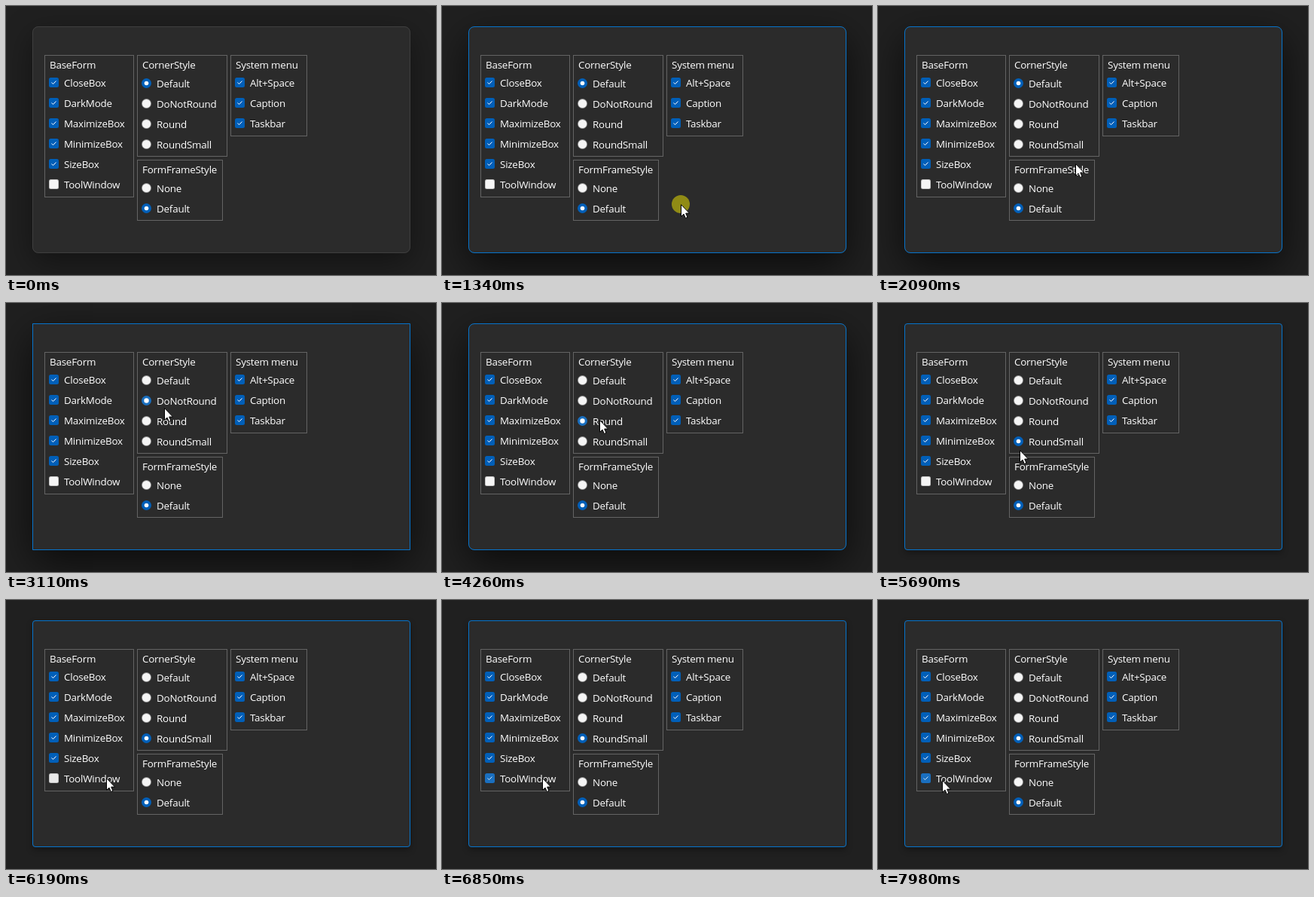
Recreate the animation shown at these times as an HTML page with a canvas. Size 571 by 357 pixels, loop 8000 ms.

```html
<!DOCTYPE html>
<html lang="en">
<head>
<meta charset="utf-8">
<title>Form options</title>
<style>
html, body { margin: 0; width: 100%; height: 100%; overflow: hidden; background: #202020; }
canvas { display: block; }
</style>
</head>
<body>
<canvas id="stage" width="571" height="357"></canvas>
<script>
const ctx = document.getElementById('stage').getContext('2d');
const LOOP = 8000, PITCH = 27;
const BLUE = '#005fb8', BLUE_HOVER = '#1a6fbf';

const groups = [
  { title: 'BaseForm', x: 51, y: 65, w: 119, h: 189, type: 'check',
    items: ['CloseBox', 'DarkMode', 'MaximizeBox', 'MinimizeBox', 'SizeBox', 'ToolWindow'] },
  { title: 'CornerStyle', x: 174, y: 65, w: 120, h: 135, type: 'radio',
    items: ['Default', 'DoNotRound', 'Round', 'RoundSmall'] },
  { title: 'FormFrameStyle', x: 174, y: 204, w: 114, h: 81, type: 'radio',
    items: ['None', 'Default'] },
  { title: 'System menu', x: 298, y: 65, w: 102, h: 108, type: 'check',
    items: ['Alt+Space', 'Caption', 'Taskbar'] }
];

// Pointer moves: start and end time, step count, start, end, optional bend
const moves = [
  { t0: 790, t1: 1140, n: 6, from: [420, 364], to: [317, 263] },
  { t0: 1800, t1: 2440, n: 10, from: [317, 263], to: [211, 134], bend: [259.5, 219.5] },
  { t0: 3040, t1: 3390, n: 6, from: [211, 134], to: [209, 154] },
  { t0: 4260, t1: 4670, n: 7, from: [209, 154], to: [207, 181] },
  { t0: 5410, t1: 6190, n: 12, from: [207, 181], to: [133, 236] },
  { t0: 7910, t1: 7980, n: 2, from: [133, 236], to: [85, 239] }
];

const clicks = [[1340, 1470], [2770, 2840], [3590, 3730], [4870, 4940], [6720, 6850]];

const smooth = u => u * u * (3 - 2 * u);

function pointerAt(t) {
  const m = moves.filter(move => t >= move.t0).pop();
  if (!m) return null;
  const dt = (m.t1 - m.t0) / (m.n - 1);
  const step = Math.min(m.n, Math.floor((t - m.t0) / dt + 1e-6) + 1);
  const u = smooth(step / m.n);
  return [0, 1].map(i => {
    const mid = m.bend ? m.bend[i] : (m.from[i] + m.to[i]) / 2;
    return Math.round((1 - u) ** 2 * m.from[i] + 2 * u * (1 - u) * mid + u * u * m.to[i]);
  });
}

function cornerAt(t) {
  if (t < 2840) return 0;
  if (t < 3660) return 1;
  return t < 4940 ? 2 : 3;
}

function rounded(x, y, w, h, r) {
  ctx.beginPath();
  ctx.roundRect(x, y, w, h, r);
}

function disc(x, y, r, color) {
  ctx.beginPath();
  ctx.arc(x, y, r, 0, Math.PI * 2);
  ctx.fillStyle = color;
  ctx.fill();
}

function label(text, x, y) {
  ctx.fillStyle = '#ffffff';
  ctx.fillText(text, x, y);
}

function drawWindow(active, corner) {
  const radius = [8, 0, 8, 4][corner];
  const [blur, drop, alpha] = corner === 3 ? [9, 4, 0.3]
    : active ? [52, 17, 0.65] : [40, 12, 0.42];
  ctx.save();
  ctx.shadowColor = `rgba(0,0,0,${alpha})`;
  ctx.shadowBlur = blur;
  ctx.shadowOffsetY = drop;
  rounded(35, 27, 502, 301, radius);
  ctx.fillStyle = '#2b2b2b';
  ctx.fill();
  ctx.restore();

  rounded(35.5, 27.5, 501, 300, Math.max(0, radius - 0.5));
  ctx.strokeStyle = active ? '#0674cc' : '#3f3f3f';
  ctx.lineWidth = 1;
  ctx.stroke();
}

function drawCheck(x, y, on, hover) {
  rounded(x - 6.5, y - 6.5, 13, 13, 2.5);
  ctx.fillStyle = on ? (hover ? BLUE_HOVER : BLUE) : '#c4c4c4';
  ctx.fill();
  if (on) {
    ctx.beginPath();
    ctx.moveTo(x - 3, y);
    ctx.lineTo(x - 1, y + 2);
    ctx.lineTo(x + 3, y - 2);
    ctx.strokeStyle = hover ? '#d6e5f3' : '#ffffff';
    ctx.lineWidth = 1;
    ctx.stroke();
  } else {
    rounded(x - 5.5, y - 5.5, 11, 11, 1.5);
    ctx.fillStyle = hover ? '#e9e9e9' : '#f5f5f5';
    ctx.fill();
  }
}

function drawRadio(x, y, on, hover) {
  disc(x, y, 6.5, on ? (hover ? BLUE_HOVER : BLUE) : '#949494');
  if (on) disc(x, y, hover ? 3.2 : 2.8, '#ffffff');
  else disc(x, y, 5.6, hover ? '#e9e9e9' : '#f5f5f5');
}

function drawGroup(g, isOn, pointer) {
  ctx.strokeStyle = '#646464';
  ctx.lineWidth = 1;
  ctx.strokeRect(g.x + 0.5, g.y + 0.5, g.w - 1, g.h - 1);
  label(g.title, g.x + 7, g.y + 18);

  const radio = g.type === 'radio';
  g.items.forEach((name, i) => {
    const x = g.x + 12.5;
    const y = g.y + (radio ? 37.5 : 36.5) + i * PITCH;
    const right = g.x + 28 + ctx.measureText(name).width;
    const hover = pointer && pointer[0] >= g.x + 5 && pointer[0] <= right &&
      Math.abs(pointer[1] - y) <= 11;
    (radio ? drawRadio : drawCheck)(x, y, isOn(g, name, i), hover);
    label(name, g.x + 26, y + 5.5);
  });
}

function drawPointer([x, y]) {
  ctx.save();
  ctx.translate(x, y);
  ctx.beginPath();
  [[0.5, 0.6], [0.5, 16.4], [4, 13.1], [6.4, 18.5], [9, 17.4], [6.7, 12.1], [11.5, 12.1]]
    .forEach(p => ctx.lineTo(...p));
  ctx.closePath();
  ctx.fillStyle = '#ffffff';
  ctx.fill();
  ctx.strokeStyle = '#000000';
  ctx.lineWidth = 1;
  ctx.stroke();
  ctx.restore();
}

function draw(t) {
  const corner = cornerAt(t);
  const pointer = pointerAt(t);
  const isOn = (g, name, i) => {
    if (g.title === 'CornerStyle') return i === corner;
    if (g.title === 'FormFrameStyle') return i === 1;
    return name !== 'ToolWindow' || t >= 6850;
  };

  ctx.fillStyle = '#202020';
  ctx.fillRect(0, 0, 571, 357);
  ctx.font = '13.4px "Open Sans", "Noto Sans", sans-serif';
  ctx.letterSpacing = '-0.22px';
  drawWindow(t >= 1340, corner);
  groups.forEach(g => drawGroup(g, isOn, pointer));

  if (!pointer) return;
  if (clicks.some(([from, to]) => t >= from && t < to)) {
    disc(...pointer, 12, 'rgba(245,235,0,0.5)');
  }
  drawPointer(pointer);
}

const start = performance.now();
function frame() {
  draw((performance.now() - start) % LOOP);
  requestAnimationFrame(frame);
}
frame();
</script>
</body>
</html>
```
